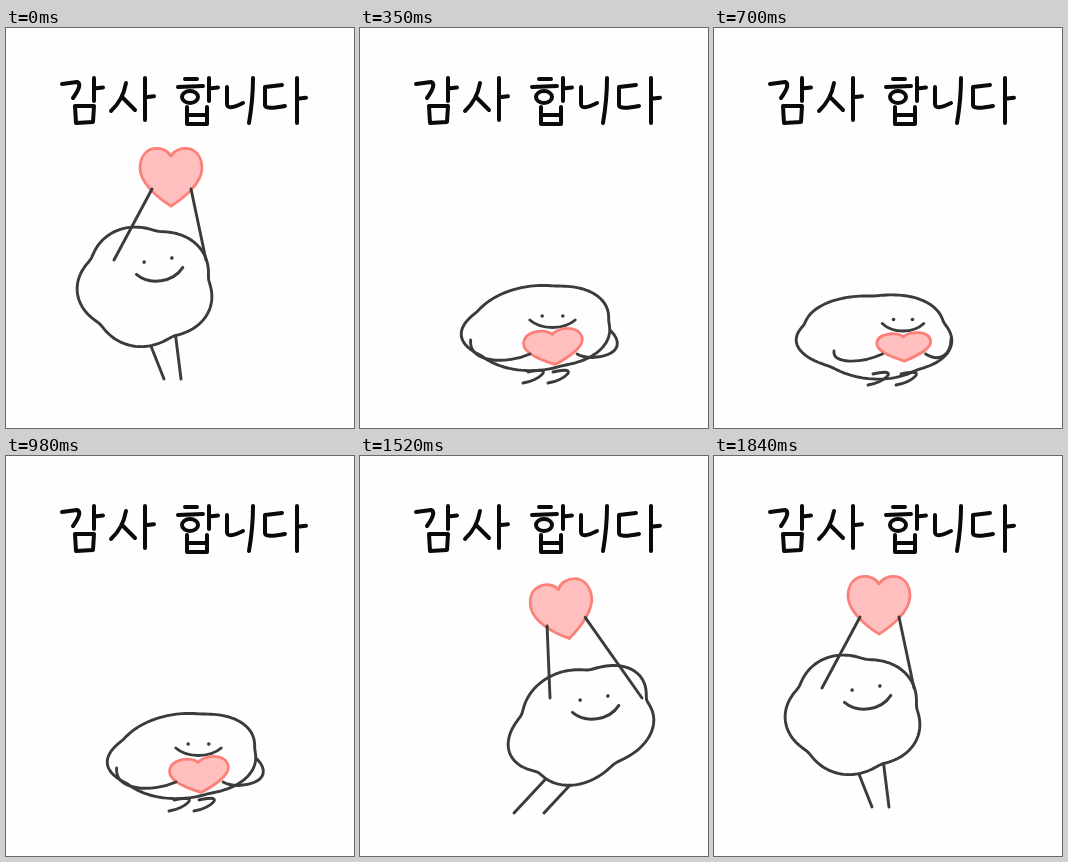
Recreate the animation shown at these times as an HTML page with a canvas. Size 348x400 px, loop 1920 ms.

```html
<!DOCTYPE html>
<html lang="ko">
<head>
<meta charset="utf-8">
<title>감사 합니다</title>
<style>
  html, body { margin: 0; width: 100%; height: 100%; overflow: hidden; background: #fefefe; }
  canvas { display: block; width: 348px; height: 400px; }
</style>
</head>
<body>
<canvas id="stage" width="348" height="400" role="img" aria-label="감사 합니다">감사 합니다</canvas>
<script>
const ctx = document.getElementById('stage').getContext('2d');
const PAPER = '#fefefe';
const INK = '#3b3b3b';
const LOOP = 1920;

// Lobed, tilted ellipse: phase places the five notches, lobe sets their depth,
// taper makes the right side fuller than the left.
const poses = {
  leanLeft: {
    body: { x: 140, y: 258, rx: 69, ry: 61, tilt: 0, lobe: .1, phase: -1.38, taper: 0 },
    heart: { x: 165, y: 149, w: 31, h: 30, tilt: 0 },
    legs: { hip: -1, foot: 158, gap: 17, floor: 351 }
  },
  squatLeft: {
    body: { x: 160, y: 308, rx: 79, ry: 43, tilt: 0, lobe: .08, phase: -1.57, taper: .08 },
    heart: { x: 190, y: 319, w: 27, h: 14.5, tilt: -.05 },
    foot: { x: 154, y: 357, gap: 28 }, swing: 0
  },
  riseRight: {
    body: { x: 212, y: 253, rx: 74, ry: 60, tilt: -.2, lobe: .1, phase: -1.3, taper: 0 },
    heart: { x: 191, y: 136, w: 31, h: 30, tilt: -.12 },
    legs: { hip: -28, foot: 155, gap: 30, floor: 357 }
  },
  leanRight: {
    body: { x: 222, y: 268, rx: 78, ry: 57, tilt: -.45, lobe: .13, phase: -1.13, taper: 0 },
    heart: { x: 203, y: 154, w: 31, h: 30, tilt: -.22 },
    legs: { hip: -27, foot: 154, gap: 30, floor: 357 }
  },
  squatRight: {
    body: { x: 177, y: 300, rx: 76, ry: 43, tilt: -.1, lobe: .06, phase: -1.25, taper: .1 },
    heart: { x: 193.5, y: 319, w: 29.5, h: 18, tilt: -.1 },
    foot: { x: 163, y: 355, gap: 25 }, swing: 22
  },
  riseLeft: {
    body: { x: 156, y: 247, rx: 75, ry: 60, tilt: 0, lobe: .1, phase: -1.35, taper: 0 },
    heart: { x: 168, y: 133, w: 31, h: 30, tilt: -.04 },
    legs: { hip: 0, foot: 162, gap: 18, floor: 352 }
  }
};

// Each bounce passes through the first pose and rests on the second
const order = Object.values(poses);
const starts = [0, 70, 140, 280, 350, 490, 560, 700, 770, 840, 980, 1050, 1120, 1280, 1360, 1520, 1600, 1680, 1840];

// Hand lettering
const vowelA = (x, top, bottom) =>
  `M${x} ${top}V${bottom}M${x} ${top + (bottom - top) * .46}l9 -1`;
const lettering = new Path2D([
  'M56 56L71 54Q77 56 67 70M69 78H88L87 94L70 95Z', vowelA(88, 50, 73),
  'M120 55Q117 72 105 83M116 69L129 82', vowelA(139, 50, 92),
  'M179 51H191M172 59L197 58M192 69a8 6 0 1 0 -16 0a8 6 0 1 0 16 0', vowelA(203, 50, 73),
  'M181 79V96H201V79M181 87H201',
  'M221 59V76Q221 83 237 75M247 50Q247 72 243 95',
  'M276 57L259 59V77Q259 82 279 78', vowelA(291, 50, 95)
].join(''));

function pen(color, width) {
  ctx.strokeStyle = color;
  ctx.lineWidth = width;
}

function line(x1, y1, x2, y2) {
  ctx.beginPath();
  ctx.moveTo(x1, y1);
  ctx.lineTo(x2, y2);
  ctx.stroke();
}

function curve(x, y, ...ctrl) {
  ctx.beginPath();
  ctx.moveTo(x, y);
  ctx.bezierCurveTo(...ctrl);
  ctx.stroke();
}

function drawBody({ x, y, rx, ry, tilt, lobe, phase, taper }) {
  ctx.save();
  ctx.translate(x, y);
  ctx.rotate(tilt);
  ctx.beginPath();
  for (let a = 0; a < Math.PI * 2; a += .04) {
    const swell = Math.sqrt(Math.sin(2.5 * (a - phase)) ** 2 + .02);
    const r = 1 - lobe * (1 - swell);
    ctx.lineTo(rx * r * Math.cos(a), ry * r * Math.sin(a) * (1 + taper * Math.cos(a)));
  }
  ctx.closePath();
  ctx.restore();
  ctx.fillStyle = PAPER;
  ctx.fill();
  ctx.stroke();
}

function drawHeart({ x, y, w, h, tilt }) {
  ctx.save();
  ctx.translate(x, y);
  ctx.rotate(tilt);
  ctx.scale(w, h);
  ctx.beginPath();
  ctx.moveTo(0, -.7);
  for (const s of [-1, 1]) {
    ctx.moveTo(0, -.7);
    ctx.bezierCurveTo(s * .2, -1.08, s * .98, -1.1, s, -.3);
    ctx.bezierCurveTo(s, .2, s * .42, .7, 0, .97);
  }
  ctx.restore();
  ctx.fillStyle = '#ffbfbf';
  ctx.fill('evenodd');
  pen('#fb8078', 2.8);
  ctx.stroke();
  pen(INK, 2.9);
}

// Eyes around (x, y), with a smile that starts "drop" below them and sags by "sag"
function drawFace(x, y, eye, smile, drop, sag, tilt) {
  ctx.save();
  ctx.translate(x, y);
  ctx.rotate(tilt);
  ctx.fillStyle = INK;
  for (const s of [-1, 1]) {
    ctx.beginPath();
    ctx.arc(s * eye, 0, 1.8, 0, Math.PI * 2);
    ctx.fill();
  }
  curve(-smile, drop, -smile / 2, drop + sag * 1.33, smile / 2, drop + sag * 1.33, smile, drop);
  ctx.restore();
}

function drawStanding({ body, heart, legs }) {
  for (const i of [0, 1]) {
    line(body.x + legs.hip + i * 30, body.y + 45, legs.foot + i * legs.gap, legs.floor);
  }
  drawBody(body);
  drawFace(body.x + 12, body.y - 26, 14, 23.5, 11, 10, -.15);
  drawHeart(heart);
  const cos = Math.cos(heart.tilt), sin = Math.sin(heart.tilt);
  for (const [hand, shoulder] of [[-19, -32], [20, 60]]) {
    line(heart.x + hand * cos - 12 * sin, heart.y + hand * sin + 12 * cos,
      body.x + shoulder, body.y - 26);
  }
}

function drawSquatting({ body, heart, foot, swing }) {
  drawBody(body);
  drawFace(heart.x - 1, heart.y - heart.h - 13, heart.w * .35, heart.w * .77, 4, 7.5, 0);
  drawHeart(heart);

  const handY = heart.y + 7;
  const left = heart.x - heart.w * .8, right = heart.x + heart.w * .8;
  const shoulder = body.x - 40 - swing * 1.2, edge = body.x + body.rx - 2;
  curve(left, handY, left - 22, handY + 10, shoulder - 2, handY + 10, shoulder, handY - 3 - swing / 2);
  curve(right, handY, right + 15, handY + 9, edge + swing, handY, edge, body.y + 3);

  for (const i of [0, 1]) {
    const x = foot.x + i * foot.gap, y = foot.y;
    curve(x, y, x + 16, y - 2, x + 34, y - 18, x + 5, y - 11);
  }
}

function draw(t) {
  ctx.fillStyle = PAPER;
  ctx.fillRect(0, 0, 348, 400);
  ctx.lineCap = ctx.lineJoin = 'round';
  pen('#0a0a0a', 4);
  ctx.stroke(lettering);
  pen(INK, 2.9);
  const step = starts.filter(s => s <= t).length - 1;
  const pose = order[step % order.length];
  pose.legs ? drawStanding(pose) : drawSquatting(pose);
}

const begin = performance.now();
function tick() {
  draw((performance.now() - begin) % LOOP);
  requestAnimationFrame(tick);
}
tick();
</script>
</body>
</html>
```
